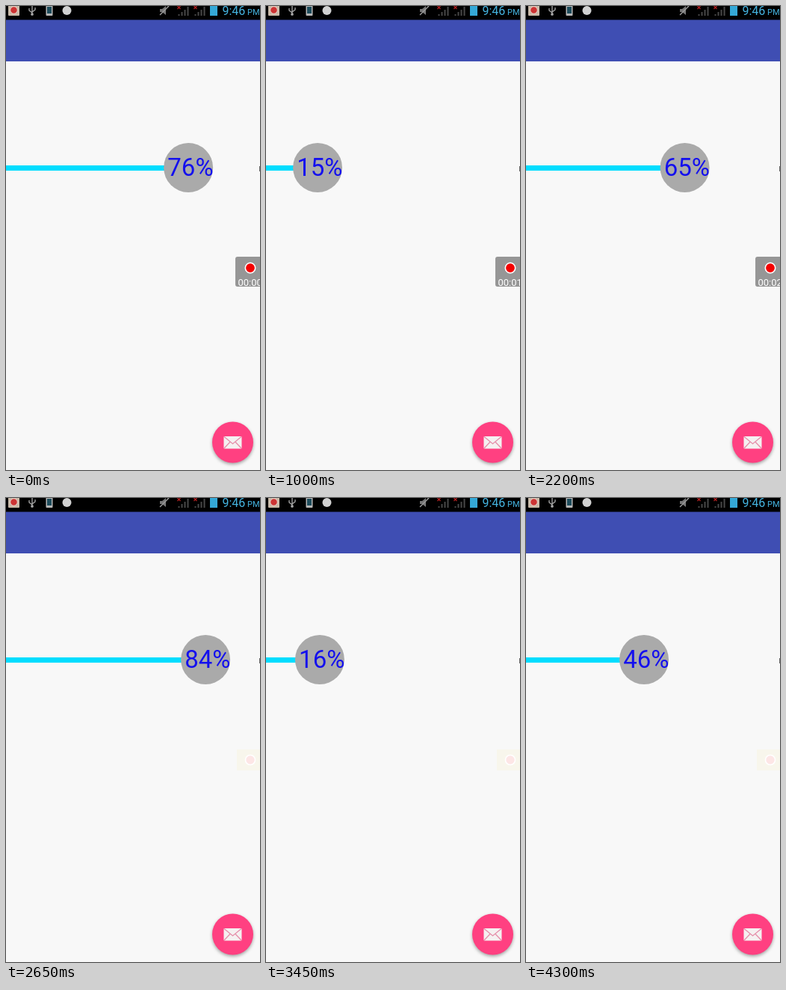
An HTML page for the animation above (4.35 s loop, 340 by 620 pixels).

```html
<!DOCTYPE html>
<html lang="en">
<head>
<meta charset="utf-8">
<title>Progress</title>
<style>
html, body { margin: 0; width: 100%; height: 100%; overflow: hidden; background: #f8f8f8; }
svg { display: block; width: 340px; height: 620px; font-family: Roboto, "Noto Sans", sans-serif; }
.fab { filter: drop-shadow(0 2px 2px rgba(0, 0, 0, .35)); }
</style>
</head>
<body>
<svg viewBox="0 0 340 620">
  <defs>
    <g id="signal">
      <path d="M1 13V11h2v2zM5 13V8h2v5zM9 13V5h2v8zM13 13V1h2v12z" fill="#484848"/>
      <path d="M0 0l4 4M4 0l-4 4" stroke="#b82020" stroke-width="1.2"/>
    </g>
    <clipPath id="panel"><rect x="307" y="335" width="33" height="40"/></clipPath>
  </defs>

  <rect width="340" height="620" fill="#f8f8f8"/>
  <rect y="18" width="340" height="56" fill="#3f4eb3"/>
  <rect width="340" height="18.5"/>

  <!-- status bar -->
  <rect x="3" y="-2" width="15" height="15" rx="1" fill="#c9b9a8"/>
  <circle cx="10.500" cy="5.500" r="4.800" fill="#c33" stroke="#eee2d8"/>
  <g fill="none" stroke="#aaa" stroke-width="1.300">
    <path d="M35 0V11M31 3v3l4 3M39 2v3l-4 3"/>
    <circle cx="35" cy="11" r="1.200" fill="#aaa"/>
  </g>
  <rect x="53.500" y="-1" width="9" height="14" rx="1" fill="#b5b5b5"/>
  <rect x="55" y="1" width="6" height="9" fill="#1d4c5c"/>
  <circle cx="81.500" cy="6" r="6" fill="#d2d2d2"/>
  <path d="M206 4h3l5-4v12l-5-4h-3z" fill="#777"/>
  <path d="M206 12L218 0" stroke="#999" stroke-width="1.500"/>
  <use href="#signal" x="229.500"/>
  <use href="#signal" x="251.500"/>
  <rect x="273" y="-1" width="10" height="14" fill="#35a9d8"/>
  <g fill="#45b5e2">
    <text x="289.500" y="12" font-size="16">9:46</text>
    <text x="323" y="12" font-size="11">PM</text>
  </g>

  <!-- progress -->
  <rect id="bar" y="213" height="7" fill="#00ddff"/>
  <g id="knob">
    <circle cx="33" cy="216" r="33" fill="#aaa"/>
    <text id="label" x="5.200" y="227" font-size="33" fill="#1410ee"></text>
  </g>
  <path d="M339.500 214v7" stroke="#666"/>

  <!-- recorder -->
  <g id="recorder" clip-path="url(#panel)">
    <rect x="307" y="335" width="40" height="40" rx="3" fill="#969696"/>
    <circle cx="327" cy="350" r="6.700" fill="#f40000" stroke="#fff" stroke-width="1.600"/>
    <text id="clock" x="310.500" y="374" font-size="13" fill="#fff"></text>
  </g>
  <g id="trace">
    <rect x="309" y="336" width="31" height="28" fill="#f8f6ec"/>
    <circle cx="327" cy="350" r="6.500" fill="#fde6e6" stroke="#fff" stroke-width="1.600"/>
  </g>

  <!-- mail button -->
  <circle class="fab" cx="303.500" cy="583" r="27.500" fill="#ff4081"/>
  <rect x="291.500" y="575" width="24" height="16.500" rx="1" fill="#f5f1f1"/>
  <path d="M292 575.500l11.500 9.500 11.500-9.500M292 591l8-8.500M315 591l-8-8.500" fill="none" stroke="#e58ca8" stroke-width="1.200"/>
</svg>
<script>
const LOOP = 4350, STEP = 50;
const HIDE_AT = 2300;
// [time in ms, running percentage]
const KEYS = [[0, 76], [400, 91], [1000, 115], [1700, 143], [2650, 184], [3450, 216], [4300, 246]];
const el = id => document.getElementById(id);
const bar = el("bar"), knob = el("knob"), label = el("label");
const clock = el("clock"), recorder = el("recorder"), trace = el("trace");

function percentAt(t) {
  const i = KEYS.findIndex(([end]) => t <= end);
  if (i < 1) return KEYS[0][1];
  const [t0, p0] = KEYS[i - 1], [t1, p1] = KEYS[i];
  return Math.round(p0 + (p1 - p0) * (t - t0) / (t1 - t0)) % 100;
}

function draw(t) {
  const percent = percentAt(t);
  const left = percent * 2.87 - 7;
  bar.setAttribute("width", Math.max(0, left + 1));
  knob.setAttribute("transform", `translate(${left} 0)`);
  label.textContent = percent + "%";
  clock.textContent = "00:0" + Math.floor((t + 300) / 1000);
  const recording = t < HIDE_AT;
  recorder.style.display = recording ? "" : "none";
  trace.style.display = recording ? "none" : "";
}

const start = performance.now();
function tick(now) {
  const t = Math.max(0, now - start) % LOOP;
  draw(Math.floor(t / STEP) * STEP);
  requestAnimationFrame(tick);
}
draw(0);
requestAnimationFrame(tick);
</script>
</body>
</html>
```
